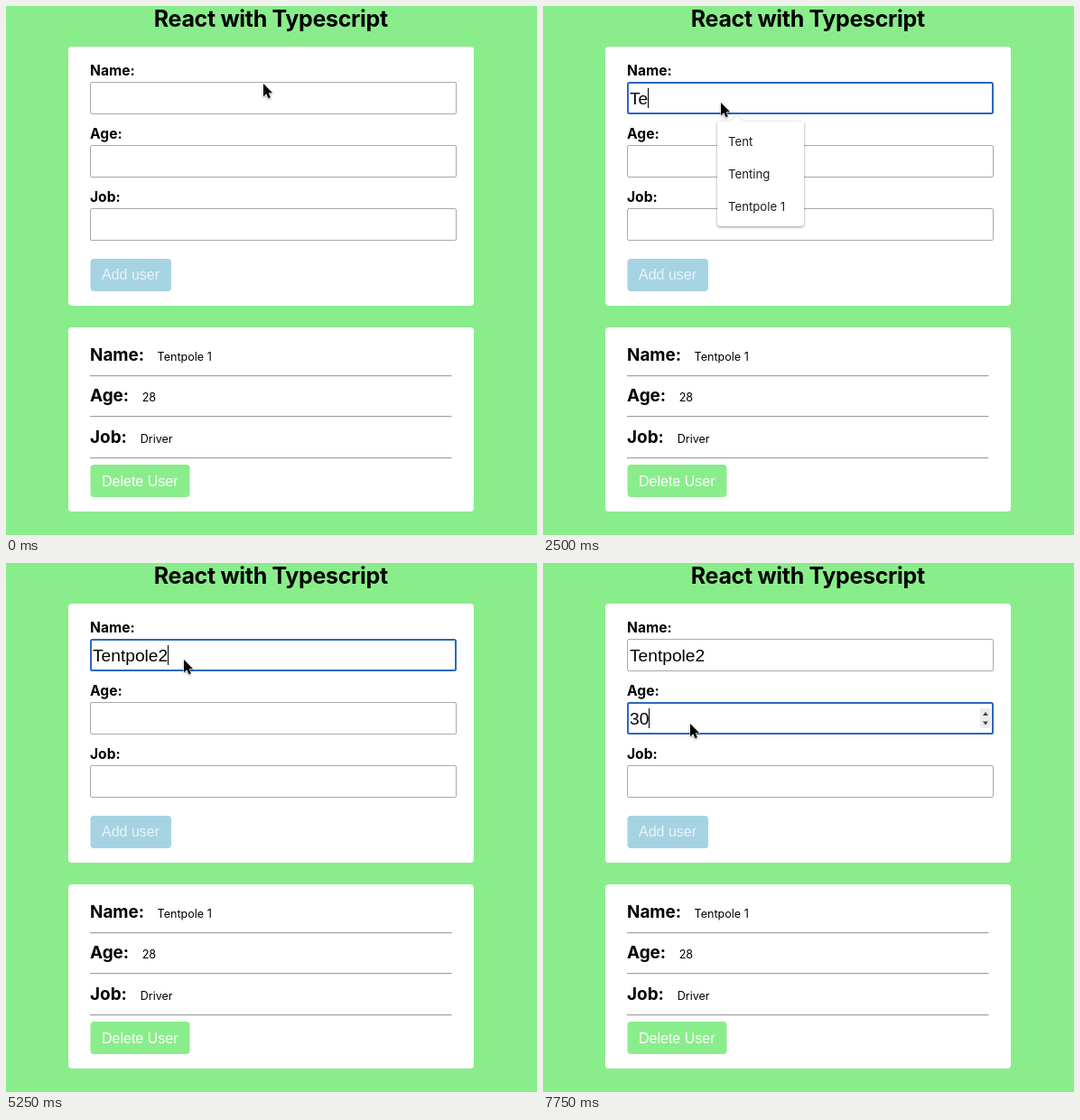
Animation, 588 px wide and 586 px high, one loop 8 s. Source, as an HTML page:

```html
<!DOCTYPE html>
<html lang="en">
<head>
<meta charset="utf-8">
<title>React with Typescript</title>
<style>
  html, body { margin: 0; width: 100%; height: 100%; overflow: hidden; background: #8aed8b; }
  svg { display: block; width: 588px; height: 586px; }
  text { font-family: Inter, "Open Sans", sans-serif; fill: #000; white-space: pre; }
  .title { font-size: 25px; font-weight: 700; letter-spacing: -.013em; text-anchor: middle; }
  .label { font-size: 15.6px; font-weight: 700; }
  .key { font-size: 18.9px; font-weight: 700; }
  .value { font-size: 12.6px; }
  .button { font: 16px "Liberation Sans", Arial, sans-serif; fill: #fff; }
  .typed { font: 19.2px "Liberation Sans", Arial, sans-serif; }
  .option { font-size: 13.2px; fill: #1c1c1c; }
  .field { fill: #fff; stroke: #aaa; stroke-width: 1; }
  .field.focus { stroke: #2a68bd; stroke-width: 2; }
  #popup path { fill: #fff; filter: drop-shadow(0 1px 1.5px rgba(0, 0, 0, .42)); }
  #mouse { filter: drop-shadow(0 1px 1px rgba(0, 0, 0, .35)); }
</style>
</head>
<body>
<svg id="stage" viewBox="0 0 588 586" xmlns="http://www.w3.org/2000/svg"></svg>
<script>
const LOOP = 8000;
const stage = document.getElementById('stage');

function add(tag, attrs, parent = stage, text) {
  const el = document.createElementNS('http://www.w3.org/2000/svg', tag);
  for (const key in attrs) el.setAttribute(key, attrs[key]);
  if (text !== undefined) el.textContent = text;
  parent.append(el);
  return el;
}
const box = (x, y, width, height, fill, rx = 0, parent = stage) =>
  add('rect', { x, y, width, height, fill, rx }, parent);
const label = (cls, x, y, text, parent = stage) =>
  add('text', { class: cls, x, y }, parent, text);

box(0, 0, 588, 586, '#8aed8b');
label('title', 293.3, 22.5, 'React with Typescript');
box(69, 45, 449, 287, '#fff', 4);
box(69, 356, 449, 204, '#fff', 4);

// Form
const fields = ['Name:', 'Age:', 'Job:'].map((name, i) => {
  const top = 84 + i * 70;
  label('label', 93, top - 7, name);
  return {
    top,
    frame: add('rect', { class: 'field' }),
    text: label('typed', 96, top + 25, '')
  };
});
const spinner = add('g');
box(484, 161, 12, 22, '#ececec', 2, spinner);
add('path', { d: 'M487 169l3-4 3 4zM487 175.500l3 4 3-4z', fill: '#444' }, spinner);
const caret = box(96, 91, 1, 22, '#000');

box(93.500, 280, 89.500, 36, '#a6d3e2', 4);
label('button', 106, 303, 'Add user').style.fill = '#e9f5f9';

// User card
[['Name:', 167.5, 'Tentpole 1'], ['Age:', 150.7, '28'], ['Job:', 148.7, 'Driver']].forEach(([key, x, value], i) => {
  const base = 392.500 + i * 45.500;
  label('key', 93, base, key);
  label('value', x, base, value);
  const line = Math.floor(409 + i * 45.6);
  box(93, line, 400.5, 1, '#a2a2a2');
  box(93, line + 1, 400.5, 1, '#ebebeb');
});
box(93.500, 508, 110, 36, '#8aed8b', 4);
label('button', 106, 531.500, 'Delete User');

// Suggestions
const popup = add('g', { id: 'popup' });
const lists = {
  all: [193, 'Tent', 'Tenting', 'Tentpole 1', 'Example', 'Sample entry for field', 'Demo'],
  some: [193, 'Tent', 'Tenting', 'Tentpole 1'],
  one: [193, 'Tentpole 1']
};
function fillPopup(name) {
  popup.replaceChildren();
  if (!name) return;
  const [left, ...rows] = lists[name];
  const right = name === 'all' ? 372 : 289;
  const bottom = 136 + rows.length * 36;
  add('path', {
    d: `M${left + 4} 127.500H206Q209 127 214.500 121Q220 127 223 127.500H${right - 4}q4 0 4 4` +
       `V${bottom - 4}q0 4-4 4H${left + 4}q-4 0-4-4V131.500q0-4 4-4z`
  }, popup);
  rows.forEach((row, i) => label('option', 205, 155 + i * 36, row, popup));
}

const mouse = add('g', { id: 'mouse' });
add('path', {
  d: 'M0 0V14.200L3.300 11.200L5.500 16.300L7.900 15.300L5.700 10.300H10.100Z',
  fill: '#000', stroke: '#fff', 'stroke-width': 1.1, 'stroke-linejoin': 'round', 'paint-order': 'stroke'
}, mouse);

// Each step changes only the listed properties
const steps = [
  [0, { mouse: [285, 86], name: '', age: '', focus: -1, caret: false, list: '', spin: false }],
  [500, { mouse: [254.5, 99] }],
  [750, { mouse: [252.5, 101] }],
  [1750, { mouse: [197, 107] }],
  [2000, { focus: 0, caret: true, list: 'all' }],
  [2500, { name: 'Te', list: 'some' }],
  [2750, { name: 'Ten' }],
  [3250, { caret: false }],
  [3500, { name: 'Tent', caret: true }],
  [4000, { caret: false }],
  [4500, { name: 'Tentp', caret: true, list: 'one' }],
  [4750, { name: 'Tentpole' }],
  [5250, { name: 'Tentpole2', list: '' }],
  [5500, { mouse: [183, 154] }],
  [5750, { mouse: [170, 170], caret: false, spin: true }],
  [6000, { mouse: [163, 178], focus: 1, caret: true }],
  [6500, { caret: false }],
  [7000, { caret: true }],
  [7500, { age: '3' }],
  [7750, { age: '30' }]
];
let last = {};
const states = steps.map(([at, change]) => [at, last = { ...last, ...change }]);

function show(s) {
  fields.forEach((f, i) => {
    const on = i === s.focus, inset = on ? 1 : .5;
    f.frame.setAttribute('class', on ? 'field focus' : 'field');
    const size = { x: 93 + inset, y: f.top + inset, width: 406 - 2 * inset, height: 36 - 2 * inset, rx: 1.5 };
    for (const key in size) f.frame.setAttribute(key, size[key]);
    f.text.textContent = [s.name, s.age, ''][i];
  });
  spinner.style.display = s.spin ? '' : 'none';
  caret.style.display = s.caret ? '' : 'none';
  if (s.caret) {
    const f = fields[s.focus];
    const width = f.text.textContent ? f.text.getComputedTextLength() : 0;
    caret.setAttribute('x', Math.round(96 + width));
    caret.setAttribute('y', f.top + 7);
  }
  fillPopup(s.list);
  mouse.setAttribute('transform', `translate(${s.mouse})`);
}

let shown;
function tick() {
  const t = performance.now() % LOOP;
  const state = states.findLast(([at]) => at <= t)[1];
  if (state !== shown) show(shown = state);
  requestAnimationFrame(tick);
}
tick();
</script>
</body>
</html>
```
